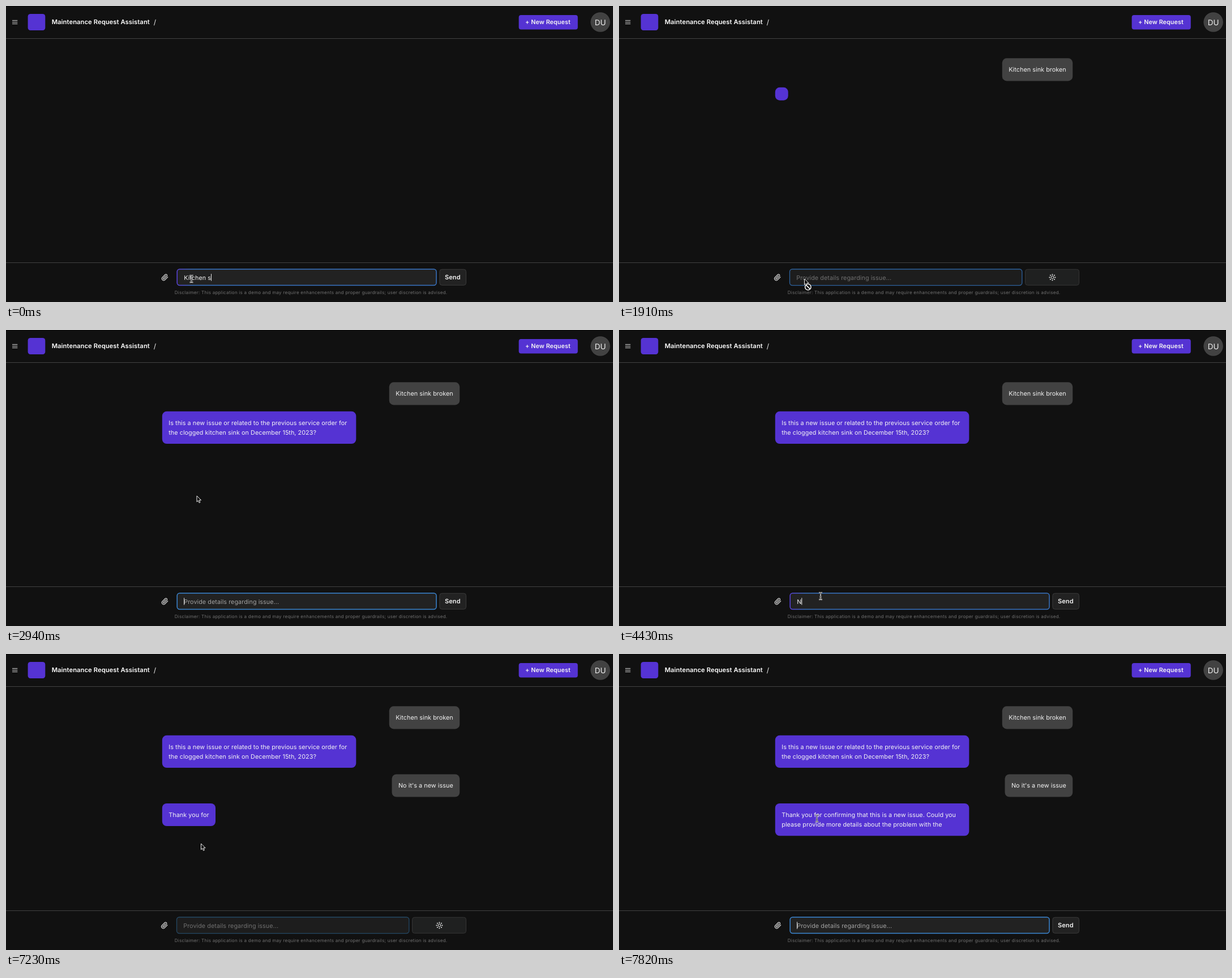
Write an HTML page with a canvas that moves like this. It is 1072 px wide and 523 px high and loops after 8000 ms.

```html
<!DOCTYPE html>
<html lang="en">
<head>
<meta charset="utf-8">
<title>Maintenance chat</title>
<style>
html, body { margin: 0; width: 100%; height: 100%; overflow: hidden; background: #111; }
canvas { display: block; width: 1072px; height: 523px; }
</style>
</head>
<body>
<canvas id="stage"></canvas>
<script>
const W = 1072, H = 523, LOOP = 8000;
const canvas = document.getElementById('stage');
const ctx = canvas.getContext('2d');
const ratio = window.devicePixelRatio || 1;
canvas.width = W * ratio;
canvas.height = H * ratio;

const FONT = 'Inter, "Open Sans", sans-serif';
const PURPLE = '#5533d3', GREY = '#424242', WHITE = '#f4f4f4';
const BODY = 10.75, LINE = 17.2, PAD = 11.45, GAP = 11.4;

const ASK = 'Kitchen sink broken';
const ANSWER = "No it's a new issue";
const REPLY_1 = [
  'Is this a new issue or related to the previous service order for',
  'the clogged kitchen sink on December 15th, 2023?'
];
const REPLY_2 = [
  'Thank you for confirming that this is a new issue. Could you',
  'please provide more details about the problem with the',
  'kitchen sink?'
];

// The picture advances in even ticks; all times below count ticks.
const TICK = 147.5;
const SEND_1 = 13, SEND_2 = 46, REPLY_TICKS = 7, FOCUS = 23;

const ASK_TYPING = [[0, 9], [7, 14], [8, 14], [11, 19]];
const ANSWER_TYPING = [[29, 0], [36, 7], [41, 13], [44, 19]];
const POINTER = [[15, 327.5, 482], [19, 337, 293], [22, 337, 293], [27, 356, 470],
  [46, 356, 470], [49, 344.5, 335], [51, 349.5, 290.5]];

const linear = p => p;
const smooth = p => p * p * (3 - 2 * p);

function track(keys, n, ease = linear) {
  const next = keys.findIndex(k => k[0] > n);
  if (next === 0) return keys[0].slice(1);
  if (next < 0) return keys[keys.length - 1].slice(1);
  const a = keys[next - 1], b = keys[next];
  const p = ease((n - a[0]) / (b[0] - a[0]));
  return a.slice(1).map((v, i) => v + (b[i + 1] - v) * p);
}

const typed = (str, keys, n) => str.slice(0, Math.round(track(keys, n)[0]));
const wordsAfter = ticks => Math.max(0, Math.round(4.6 * (ticks - 2) - 2));
const isReplying = (n, send) => n >= send && n < send + REPLY_TICKS;

function setFont(size, weight = 400, spacing = 0.07) {
  ctx.font = `${weight} ${size}px ${FONT}`;
  ctx.letterSpacing = spacing + 'px';
  ctx.textRendering = 'geometricPrecision';
}

function text(str, x, y, color = WHITE) {
  ctx.fillStyle = color;
  ctx.fillText(str, x, y);
}

function box(x, y, w, h, r, fill, stroke, width = 1) {
  ctx.beginPath();
  ctx.roundRect(x, y, w, h, r);
  ctx.fillStyle = fill;
  ctx.fill();
  if (stroke) {
    ctx.strokeStyle = stroke;
    ctx.lineWidth = width;
    ctx.stroke();
  }
}

function dot(x, y, r) {
  ctx.beginPath();
  ctx.arc(x, y, r, 0, Math.PI * 2);
  ctx.fill();
}

function drawHeader() {
  ctx.fillStyle = '#050505';
  ctx.fillRect(0, 0, W, 1);
  ctx.fillStyle = GREY;
  ctx.fillRect(0, 57, W, 1);
  ctx.fillRect(0, 453, W, 1);

  ctx.fillStyle = '#d8d8d8';
  for (let i = 0; i < 3; i++) ctx.fillRect(11, 25 + i * 3, 9.3, 1);

  box(38.6, 14, 30.7, 29.1, 4.5, PURPLE);
  setFont(11.2, 600, 0.08);
  text('Maintenance Request Assistant', 80.7, 32.4, '#fff');
  setFont(12, 400, 0);
  text('/', 260.8, 33);

  box(905.6, 16, 104.2, 25.4, 4, PURPLE);
  setFont(BODY, 600, 0.1);
  text('+ New Request', 917, 32.4);

  ctx.fillStyle = '#484848';
  dot(1049.6, 28.5, 17.2);
  ctx.fillStyle = GREY;
  dot(1049.6, 28.5, 16.4);
  setFont(13.44, 400, 0);
  ctx.textAlign = 'center';
  text('DU', 1049.6, 33.6);
  ctx.textAlign = 'left';
}

// Returns the top of the next bubble.
function drawBubble(lines, y, mine) {
  setFont(BODY);
  const inner = lines.length > 1 ? 319.6
    : Math.max(0, ...lines.map(l => ctx.measureText(l).width));
  const w = inner + PAD * 2, h = PAD * 2 + LINE * lines.length;
  const x = mine ? 801.2 - w : 275.8;
  box(x, y, w, h, 8, mine ? GREY : PURPLE);
  lines.forEach((l, i) => text(l, x + PAD, y + PAD + LINE * (i + 0.5) + 3.9));
  return y + h + GAP;
}

function firstWords(lines, count) {
  const out = [];
  for (const line of lines) {
    const words = line.split(' ');
    if (count > 0) out.push(words.slice(0, count).join(' '));
    count -= words.length;
  }
  return out;
}

function drawChat(n) {
  let y = 92.3;
  const exchange = (question, reply, send) => {
    if (n < send) return;
    y = drawBubble([question], y, true);
    y = drawBubble(firstWords(reply, wordsAfter(n - send)), y, false);
  };
  exchange(ASK, REPLY_1, SEND_1);
  exchange(ANSWER, REPLY_2, SEND_2);
}

const clip = new Path2D('m21.44 11.05-9.19 9.19a6 6 0 0 1-8.49-8.49l8.57-8.57' +
  'A4 4 0 1 1 18 8.84l-8.59 8.57a2 2 0 0 1-2.83-2.83l8.49-8.48');

function drawClip(cx) {
  ctx.save();
  ctx.translate(cx, 479.4);
  ctx.scale(0.54, 0.54);
  ctx.translate(-12, -12);
  ctx.lineWidth = 1.9;
  ctx.lineCap = ctx.lineJoin = 'round';
  ctx.strokeStyle = '#f0f0f0';
  ctx.stroke(clip);
  ctx.restore();
}

function drawSpinner(x, y) {
  ctx.fillStyle = '#f0f0f0';
  for (let i = 0; i < 8; i++) {
    const a = i * Math.PI / 4;
    dot(x + 5 * Math.cos(a), y + 5 * Math.sin(a), 1);
    dot(x + 2.3 * Math.cos(a), y + 2.3 * Math.sin(a), 0.8);
  }
}

function borderColor(n, busy) {
  if (busy) return n === SEND_1 || n === SEND_2 ? '#2d619c' : '#244864';
  const fresh = n >= SEND_1 && n < FOCUS || n >= SEND_2;
  if (fresh) return '#3b86d2';
  const g = ctx.createLinearGradient(302, 0, 330, 0);
  g.addColorStop(0, '#5a43dd');
  g.addColorStop(1, '#3974c4');
  return g;
}

function drawComposer(n, busy) {
  const hint = 'Provide details regarding issue...';
  const border = borderColor(n, busy);
  drawClip(busy ? 280 : 280.7);
  if (busy) {
    box(301.5, 465, 410.3, 28.6, 4.5, '#1d1d1d', border, 1.3);
    setFont(BODY);
    text(hint, 313.2, 483.5, '#707070');
    box(717.5, 465.3, 95, 28, 4, '#1f2020', '#353535');
    drawSpinner(765.4, 479.4);
  } else {
    box(302.2, 465, 457.8, 28.6, 4.5, '#222', border, 1.5);
    const draft = n < SEND_1 ? typed(ASK, ASK_TYPING, n)
      : n < SEND_2 ? typed(ANSWER, ANSWER_TYPING, n) : '';
    setFont(BODY);
    text(draft || hint, 314.2, 483.5, draft ? WHITE : '#a2a2a2');
    ctx.fillStyle = '#fff';
    ctx.fillRect(314.2 + ctx.measureText(draft).width, 473.3, 0.9, 12.4);
    box(765.8, 465.3, 46.7, 28, 4, '#222', '#3a3a3a');
    setFont(11, 600, 0.15);
    text('Send', 774.9, 483.3);
  }
  setFont(8.06, 400, 0.238);
  text('Disclaimer: This application is a demo and may require enhancements and ' +
    'proper guardrails; user discretion is advised.', 297.8, 508.8, '#6f6f6f');
}

const arrow = new Path2D('M0 0V10.6L2.4 8.4 4.1 12.3 5.9 11.5 4.2 7.7H7.6Z');
const beam = new Path2D('M-3 -6.3Q0 -6.3 0 -4V4Q0 6.3 -3 6.3M3 -6.3Q0 -6.3 0 -4' +
  'M0 4Q0 6.3 3 6.3M-1.6 1.6H1.6');

function outline(path, color, width) {
  ctx.strokeStyle = color;
  ctx.lineWidth = width;
  ctx.stroke(path);
}

function drawBan(x, y) {
  ctx.fillStyle = '#0a0a0a';
  dot(x, y, 6.4);
  const ban = new Path2D();
  ban.arc(x, y, 5.2, 0, Math.PI * 2);
  ban.moveTo(x - 3.6, y - 3.6);
  ban.lineTo(x + 3.6, y + 3.6);
  outline(ban, '#fff', 1.5);
}

function drawPointer(n, busy) {
  const [x, y] = track(POINTER, n, smooth);
  const overField = y > 464;
  const overText = n > SEND_2 && y < 300;
  ctx.save();
  ctx.translate(x, y);
  ctx.lineJoin = 'round';
  if ((overField && !busy) || overText) {
    outline(beam, '#e8e8e8', 2.1);
    outline(beam, '#151515', 0.7);
  } else {
    ctx.fillStyle = '#0a0a0a';
    ctx.fill(arrow);
    outline(arrow, '#f0f0f0', 1);
    if (overField) drawBan(6.3, 14.5);
  }
  ctx.restore();
}

function draw(t) {
  const n = Math.floor((t + 11) / TICK);
  const busy = isReplying(n, SEND_1) || isReplying(n, SEND_2);
  ctx.setTransform(ratio, 0, 0, ratio, 0, 0);
  ctx.fillStyle = '#111';
  ctx.fillRect(0, 0, W, H);
  drawHeader();
  drawChat(n);
  drawComposer(n, busy);
  drawPointer(n, busy);
}

const start = performance.now();
function tick() {
  draw((performance.now() - start) % LOOP);
  requestAnimationFrame(tick);
}
tick();
</script>
</body>
</html>
```
